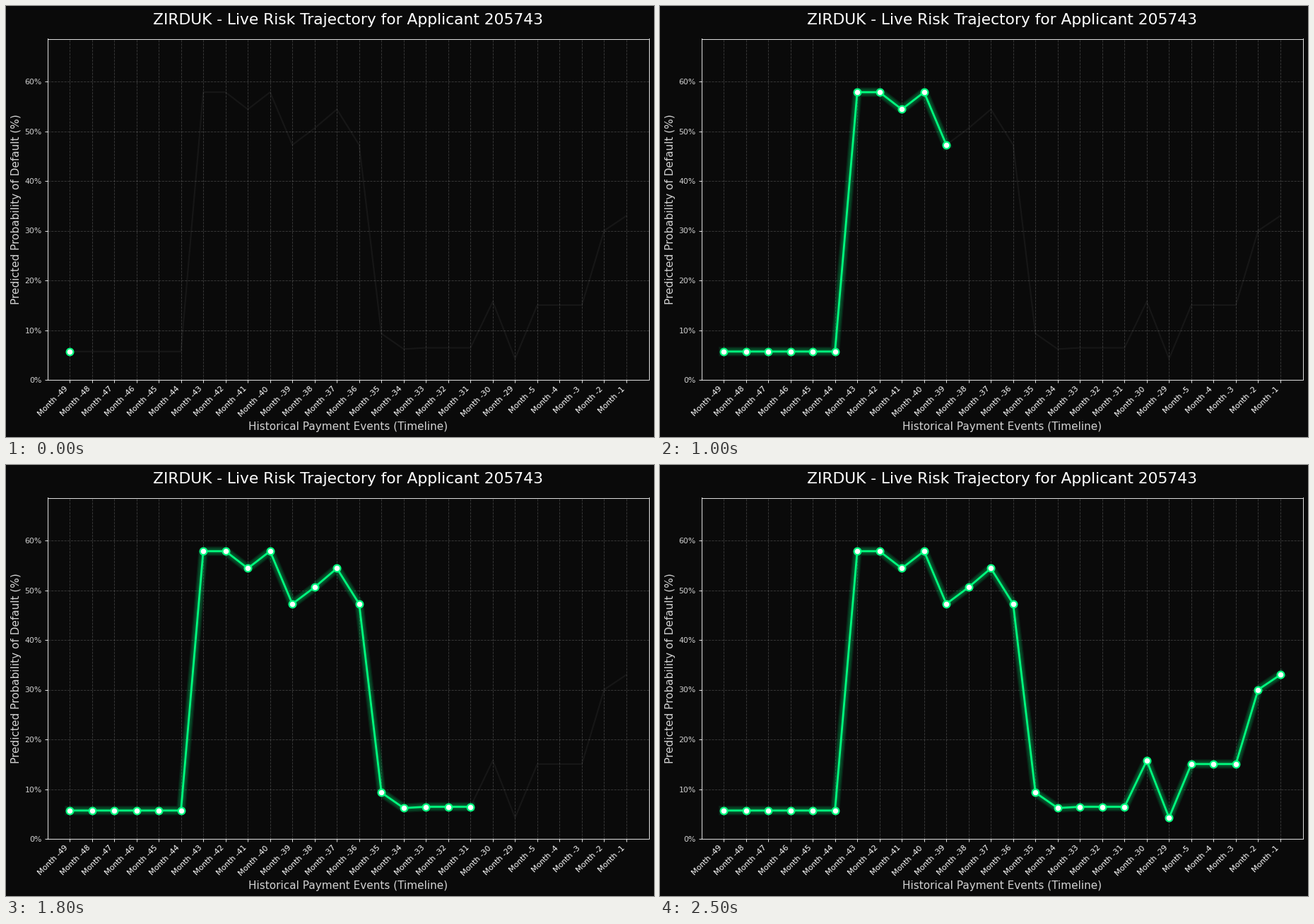
A matplotlib script for the animation above (2.52 s loop, 917 px wide and 611 px high).

```python
import matplotlib.pyplot as plt
import numpy as np
from matplotlib.animation import FuncAnimation

W, H, DPI = 917, 611, 64
LEFT, RIGHT, TOP, BOTTOM = 58.5, 909.5, 46.5, 530.0
UNIT = 1.086 * 72 / DPI  # one design point in figure points

BACK, NEON, SOFT = "#0a0a0a", "#00ff7f", "lightgray"
STEP_MS, TICK_MS, LOOP_MS = 100, 20, 2520

months = [*range(49, 28, -1), *range(5, 0, -1)]
risk = np.array([5.7] * 6 + [57.85, 57.85, 54.4, 57.85, 47.25, 50.6, 54.4, 47.25]
                + [9.3, 6.2, 6.45, 6.45, 6.45, 15.75, 4.25]
                + [15.05] * 3 + [30.0, 33.0])
steps = np.arange(len(risk))

plt.rcParams["font.family"] = "DejaVu Sans"
fig = plt.figure(figsize=(W / DPI, H / DPI), dpi=DPI, facecolor=BACK)
ax = fig.add_axes([LEFT / W, 1 - BOTTOM / H, (RIGHT - LEFT) / W, (BOTTOM - TOP) / H],
                  facecolor=BACK)
ax.set_xlim(-1, len(risk))
ax.set_ylim(0, (BOTTOM - TOP) / 7.05)


def label(x, y, text, size, color, **kw):
    fig.text(x / W, 1 - y / H, text, size=size * UNIT, color=color,
             ha="center", va="baseline", **kw)


mid_x, mid_y = (LEFT + RIGHT) / 2, (TOP + BOTTOM) / 2
label(mid_x, 25.5, "ZIRDUK - Live Risk Trajectory for Applicant 205743", 20, "white")
label(mid_x, 601, "Historical Payment Events (Timeline)", 14, SOFT)
fig.text(19 / W, 1 - mid_y / H, "Predicted Probability of Default (%)", size=14 * UNIT,
         color=SOFT, rotation=90, rotation_mode="anchor", ha="center", va="baseline")

ax.set_xticks(steps, [f"Month -{m}" for m in months], rotation=45, ha="right")
ax.set_yticks(range(0, 61, 10), [f"{v}%" for v in range(0, 61, 10)])
ax.tick_params(labelsize=10 * UNIT, length=3.5 * UNIT, pad=3.5 * UNIT,
               width=0.8 * UNIT, color="white", labelcolor="white")
ax.tick_params(axis="y", labelcolor=SOFT)
for spine in ax.spines.values():
    spine.set(color="white", linewidth=0.8 * UNIT)
ax.grid(color="white", alpha=0.2, linestyle="--", linewidth=0.8 * UNIT)
ax.set_axisbelow(True)

ax.plot(steps, risk, color="white", alpha=0.05, lw=2 * UNIT)
glow = [ax.plot([], [], color=NEON, alpha=0.08, lw=(2.5 + 2 * n) * UNIT)[0]
        for n in range(1, 6)]
core, = ax.plot([], [], color=NEON, lw=2.5 * UNIT)
dots = ax.scatter([], [], s=80 * UNIT ** 2, facecolor="white", edgecolor=NEON,
                  linewidth=2 * UNIT, zorder=5)


def update(frame):
    shown = min(frame * TICK_MS // STEP_MS + 1, len(risk))
    for line in (*glow, core):
        line.set_data(steps[:shown], risk[:shown])
    dots.set_offsets(np.column_stack([steps[:shown], risk[:shown]]))
    return (*glow, core, dots)


anim = FuncAnimation(fig, update, frames=LOOP_MS // TICK_MS, interval=TICK_MS,
                     repeat=True, repeat_delay=0)
plt.show()
```
